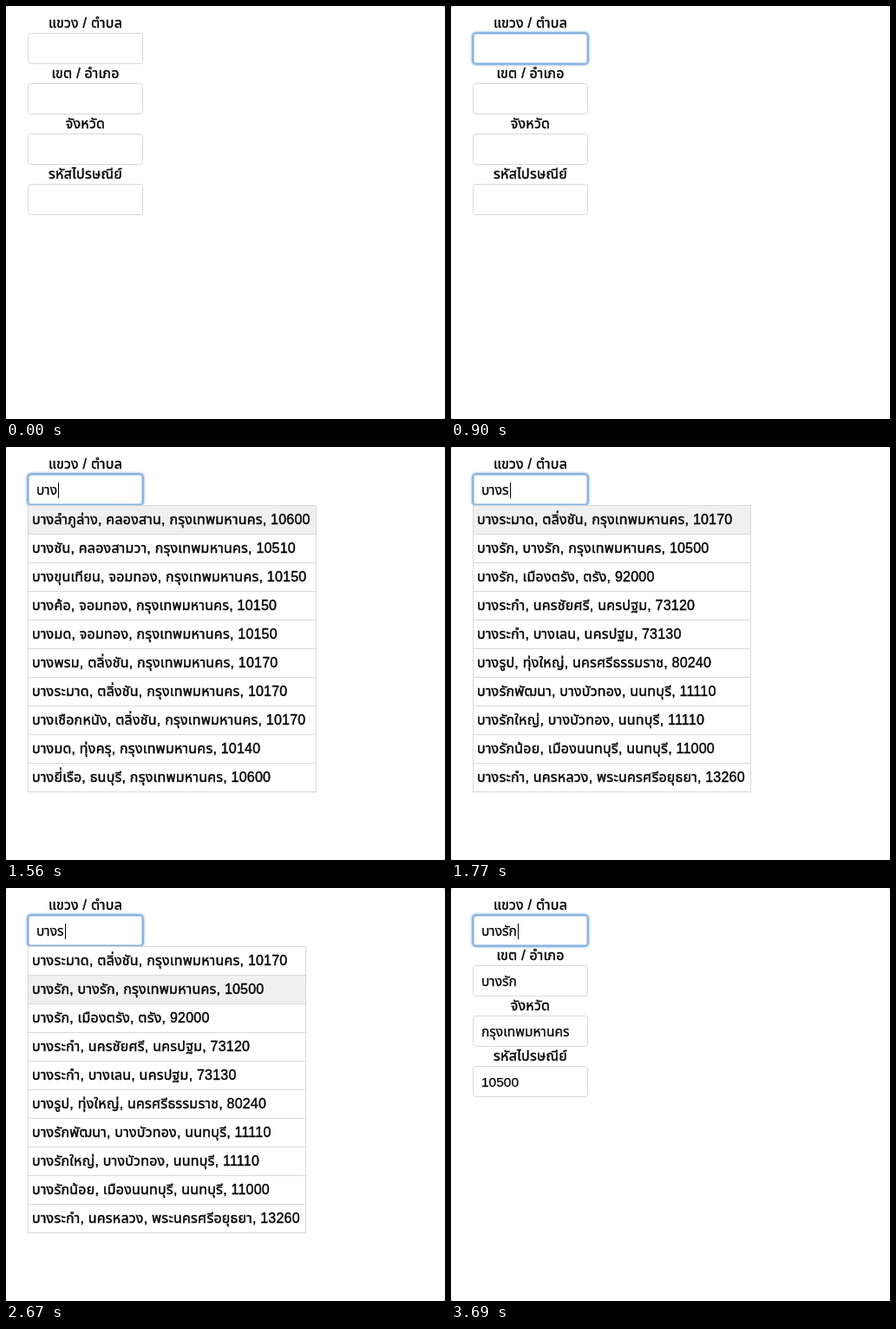
Recreate the animation shown at these times as an HTML page. Size 506 px wide and 476 px high, loop 3960 ms.

```html
<!DOCTYPE html>
<html lang="th">
<head>
<meta charset="utf-8">
<title>Address autocomplete</title>
<style>
  html, body { margin: 0; width: 100%; height: 100%; overflow: hidden; background: #8a8a8a; }
  body { position: relative; font: 16px/20px "Liberation Sans", "Noto Sans Thai", "Noto Sans", sans-serif; color: #000; }
  #stage { position: absolute; inset: 0; background: #fff; border-radius: 2px; }
  .label, .field, #list { position: absolute; left: 25px; box-sizing: border-box; white-space: nowrap; }
  .label, #list { letter-spacing: .22px; -webkit-text-stroke: .4px #000; }
  .label { width: 133px; text-align: center; }
  .field { width: 133px; height: 36px; padding: 8px 9px; border: 1px solid #d9d9d9; border-radius: 4px; background: #fff; font-size: 15.5px; -webkit-text-stroke: .25px #000; }
  .focus { border-color: #84afdf; box-shadow: 0 0 0 1px #92b8e4, 0 0 2px 2px #bcd4f0, inset 0 0 1px 1px #bcd4f0; }
  .caret::after { content: ""; display: inline-block; width: 1px; height: 18px; margin-left: 1px; vertical-align: -4px; background: #000; }
  #list { top: 67px; border: 1px solid #d9d9d9; background: #fff; }
  #list div { height: 32px; line-height: 32px; padding-left: 4px; }
  #list div + div { border-top: 1px solid #d9d9d9; }
  #list .on { background: #f0f0f0; }
</style>
</head>
<body>
<div id="stage"></div>
<script>
const BKK = "กรุงเทพมหานคร";
const bang = [
  `บางลำภูล่าง, คลองสาน, ${BKK}, 10600`,
  `บางชัน, คลองสามวา, ${BKK}, 10510`,
  `บางขุนเทียน, จอมทอง, ${BKK}, 10150`,
  `บางค้อ, จอมทอง, ${BKK}, 10150`,
  `บางมด, จอมทอง, ${BKK}, 10150`,
  `บางพรม, ตลิ่งชัน, ${BKK}, 10170`,
  `บางระมาด, ตลิ่งชัน, ${BKK}, 10170`,
  `บางเชือกหนัง, ตลิ่งชัน, ${BKK}, 10170`,
  `บางมด, ทุ่งครุ, ${BKK}, 10140`,
  `บางยี่เรือ, ธนบุรี, ${BKK}, 10600`
];
const first = ["บ้านกลาง, อ่าวลึก, กระบี่, 81110", ...bang.slice(0, 9)];
const bangR = [
  bang[6],
  `บางรัก, บางรัก, ${BKK}, 10500`,
  "บางรัก, เมืองตรัง, ตรัง, 92000",
  "บางระกำ, นครชัยศรี, นครปฐม, 73120",
  "บางระกำ, บางเลน, นครปฐม, 73130",
  "บางรูป, ทุ่งใหญ่, นครศรีธรรมราช, 80240",
  "บางรักพัฒนา, บางบัวทอง, นนทบุรี, 11110",
  "บางรักใหญ่, บางบัวทอง, นนทบุรี, 11110",
  "บางรักน้อย, เมืองนนทบุรี, นนทบุรี, 11000",
  "บางระกำ, นครหลวง, พระนครศรีอยุธยา, 13260"
];
const empty = ["", "", "", ""];
const filled = ["บางรัก", "บางรัก", BKK, "10500"];
const typed = text => [text, "", "", ""];

// Each state lasts until the next one starts.
const LOOP = 3960, BLINK = 450;
const states = [
  { at: 0, values: empty },
  { at: 420, values: empty, focus: true, caretOff: 900 },
  { at: 1230, values: typed("บ"), focus: true, rows: first, width: 333 },
  { at: 1410, values: typed("บา"), focus: true, rows: bang, width: 333 },
  { at: 1560, values: typed("บาง"), focus: true, rows: bang, width: 333 },
  { at: 1770, values: typed("บางร"), focus: true, rows: bangR, width: 321, moveAt: 2430 },
  { at: 2790, values: filled, focus: true }
];

const stage = document.getElementById("stage");
function add(parent, className, top, text = "") {
  const el = document.createElement("div");
  el.className = className;
  if (top !== undefined) el.style.top = top + "px";
  el.textContent = text;
  return parent.appendChild(el);
}

const fields = ["แขวง / ตำบล", "เขต / อำเภอ", "จังหวัด", "รหัสไปรษณีย์"].map((name, i) => {
  add(stage, "label", 10 + 58 * i, name);
  return add(stage, "field", 31 + 58 * i);
});
const list = add(stage, "");
list.id = "list";
let shown;

function show(state) {
  fields.forEach((field, i) => field.textContent = state.values[i]);
  fields[0].classList.toggle("focus", !!state.focus);
  list.hidden = !state.rows;
  list.style.width = state.width + "px";
  list.replaceChildren();
  (state.rows || []).forEach(row => add(list, "", undefined, row));
  shown = state;
}

function draw(now) {
  const t = now % LOOP;
  const state = states.findLast(s => s.at <= t);
  if (state !== shown) show(state);
  const off = state.caretOff || state.at + BLINK;
  const lit = t < off || t >= off + BLINK;
  fields[0].classList.toggle("caret", !!state.focus && lit);
  const active = t >= state.moveAt ? 1 : 0;
  [...list.children].forEach((row, i) => row.classList.toggle("on", i === active));
  requestAnimationFrame(draw);
}
requestAnimationFrame(draw);
</script>
</body>
</html>
```
